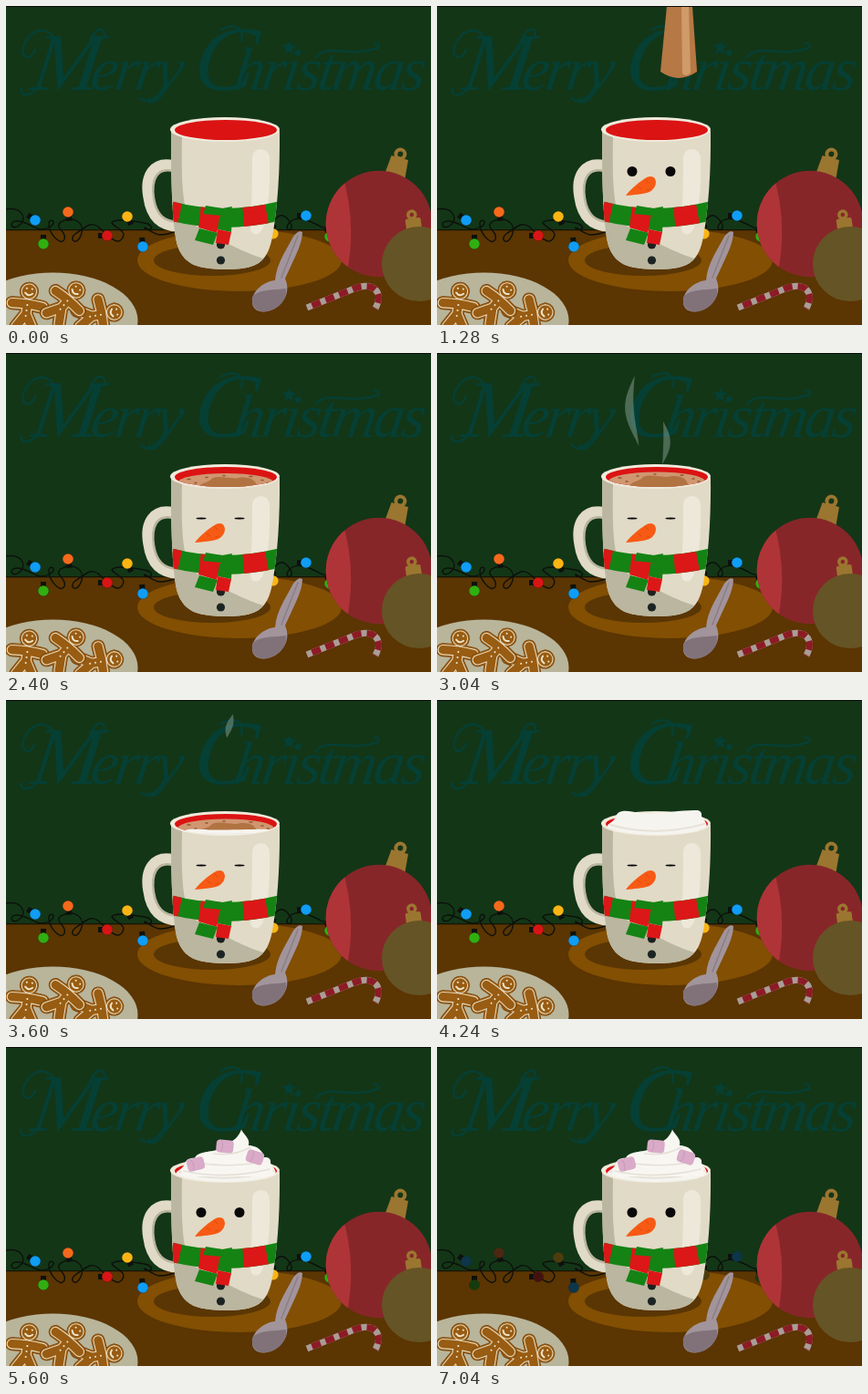
Animation, 466 px wide and 350 px high, one loop 7120 ms. Source, as an HTML page:

```html
<!DOCTYPE html>
<html lang="en">
<head>
<meta charset="utf-8">
<title>Christmas mug</title>
<style>
html, body { margin: 0; width: 100%; height: 100%; overflow: hidden; background: #133617; }
svg { display: block; }
text { font-family: "Liberation Serif", "Noto Serif", serif; font-style: italic; fill: #063f34; }
.line { fill: none; stroke-linecap: round; stroke-linejoin: round; }
</style>
</head>
<body>
<svg width="466" height="350" viewBox="0 0 466 350">
  <defs>
    <path id="body" d="M181 137C181 185 181.5 222 186 254C189 274 200 283 212 286C228 290 256 290 268 286C282 282 288 272 291.5 256C298 222 300.5 180 300 137Z"/>
    <clipPath id="inBody"><use href="#body"/></clipPath>
    <clipPath id="inCup"><ellipse cx="241" cy="136" rx="56" ry="11"/></clipPath>
    <clipPath id="overCup"><path d="M0 0H466V136H298A57 12 0 0 1 184 136H0Z"/></clipPath>
    <clipPath id="inBall"><circle cx="409" cy="239" r="58.3"/></clipPath>
    <path id="man" d="M-3 -17a3 3 0 1 0 6 0a3 3 0 1 0 -6 0M-17 -2Q0 -4 17 -2M0 -3V9M0 8L-9 23M0 8L9 23"/>
    <g id="cookie" class="line">
      <use href="#man" stroke="#77400b" stroke-width="15"/>
      <use href="#man" stroke="#985c12" stroke-width="13.8"/>
      <use href="#man" stroke="#e4d6b8" stroke-width="11.5"/>
      <use href="#man" stroke="#985c12" stroke-width="9.3"/>
      <path d="M-4 -15Q0 -11 4 -15M-3 -20h.1M3 -20h.1M0 -2h.1M0 4h.1M0 10h.1" stroke="#eee3c8" stroke-width="2"/>
    </g>
    <g id="mallow">
      <rect x="-9.5" y="-7" width="19" height="14" rx="4" fill="#d9abc8"/>
      <path d="M-4 -6Q-1 0 -4 6" class="line" stroke="#c99ab4"/>
    </g>
  </defs>

  <rect width="466" height="350" fill="#133617"/>

  <!-- lettering, leaning about its baseline -->
  <g transform="translate(0 92) skewX(-8)">
    <text x="26" font-size="90">M<tspan x="91" font-size="67" letter-spacing="-3.5">erry</tspan></text>
    <text x="203" font-size="101">C<tspan x="248" font-size="67" letter-spacing="-3">hristmas</tspan></text>
  </g>
  <g class="line" stroke="#063f34" stroke-width="2.5">
    <path d="M54 40C48 20 28 24 20 42C14 56 26 62 32 48"/>
    <path d="M34 90C26 101 14 98 17 91M92 38C98 24 108 22 108 32"/>
    <path d="M176 82C168 104 154 108 148 101M258 38C262 22 248 19 236 26"/>
    <path d="M340 56C354 40 374 58 408 46Q410 41 404 41"/>
  </g>
  <path d="M311 38l2 5 6 1-5 3 1 6-5-3-5 3 2-6-4-4 6-1z" fill="#063f34"/>

  <!-- table -->
  <rect y="246" width="466" height="104" fill="#5b3502"/>
  <rect y="245" width="466" height="1.3" fill="#151607"/>
  <ellipse cx="256" cy="279" rx="112" ry="34" fill="#824f03"/>
  <ellipse cx="226" cy="279" rx="64" ry="17" fill="#5a3604"/>

  <!-- lights -->
  <path class="line" stroke="#0c100a" stroke-width="1.4" d="M0 223C18 220 24 234 14 241C6 247 2 236 12 236C26 236 34 250 47 243C58 237 48 232 47 238C46 248 60 265 64 256C67 246 52 244 60 237C74 229 88 238 82 252C77 264 68 256 76 250C88 242 93 236 101 242C114 254 123 264 128 254C132 246 120 244 116 238C118 232 140 236 152 238C166 241 157 249 152 244C150 240 160 250 168 251Q178 251 186 247M290 244C298 224 306 228 312 238C317 247 305 248 309 240C317 227 334 236 347 243Q354 244 358 237"/>
  <g id="bulbs"></g>

  <!-- plate -->
  <ellipse cx="51.5" cy="345" rx="93" ry="52.5" fill="#b8b59b"/>
  <use href="#cookie" transform="translate(23 330) rotate(8)"/>
  <use href="#cookie" transform="translate(102 339) rotate(80)"/>
  <use href="#cookie" transform="translate(66 325) rotate(40)"/>

  <!-- mug -->
  <path class="line" d="M184 175C162 170 152 186 156 209C159 231 170 242 190 242" stroke="#e1dac6" stroke-width="11.5"/>
  <path class="line" d="M183 181C165 177 159 191 162 211C165 229 173 236 188 237" stroke="#b9b59e" stroke-width="2.5"/>
  <use href="#body" fill="#e1dac6"/>
  <g clip-path="url(#inBody)">
    <path d="M175 130L193 143C192 190 193 230 206 240C222 250 258 270 285 278L270 300H175Z" fill="#bab69f"/>
    <path d="M270 166Q271 157 280 157Q289 158 289 168C290 200 287 225 282 243Q277 254 270 249Q266 244 268 230C270 210 270 190 270 166Z" fill="#ede8da"/>
  </g>
  <ellipse cx="240" cy="135.5" rx="60" ry="13.5" fill="#f0eadc"/>
  <ellipse cx="241" cy="136" rx="56" ry="11" fill="#db1313"/>
  <g clip-path="url(#inCup)">
    <g id="drink">
      <ellipse cx="241" cy="141" rx="53" ry="10.5" fill="#cf9670"/>
      <path d="M211 150C209 140 222 142 226 136C236 132 248 138 257 135C270 134 276 139 276 150Z" fill="#b17342"/>
      <path class="line" stroke="#8f5830" stroke-width="1.4" d="M199 137h3M207 141h2M219 135h2M267 134h3M280 138h2M286 141h2M238 133h2"/>
    </g>
  </g>
  <circle cx="235.5" cy="262" r="4.6" fill="#1c201e"/>
  <circle cx="235.5" cy="279" r="4.6" fill="#1c2423"/>

  <!-- scarf -->
  <g clip-path="url(#inBody)" fill="none" stroke-width="21">
    <path d="M181 225Q238 240 300 225" stroke="#148314"/>
    <path d="M181 225Q238 240 300 225" stroke="#dc1717" stroke-dasharray="10 22 25 23 26 99"/>
  </g>
  <path d="M219 219L237 222L248 220L246 230L233 233L216 229Z" fill="#148314"/>
  <path d="M215 228L236 230L231 249L211 243Z" fill="#dc1717"/>
  <path d="M212 244L232 249L227 262L207 257Z" fill="#148314"/>
  <path d="M234 231L248 230L247 248L232 245Z" fill="#148314"/>
  <path d="M232 245L247 248L244 262L230 260Z" fill="#dc1717"/>

  <!-- face -->
  <ellipse class="eye" cx="214" cy="181.5" fill="#080808"/>
  <ellipse class="eye" cx="256" cy="181.5" fill="#080808"/>
  <g id="nose">
    <path d="M207 208C213 200 223 192 231 187.5Q239 185 240 193Q240 200 233 204C225 207 216 207 207 208Z" fill="#f75a14"/>
    <path class="line" stroke="#dc4a0b" d="M220 198l4 3M229 191l3 3M230 202l3-1"/>
  </g>

  <!-- pour, steam, toppings -->
  <g clip-path="url(#overCup)">
    <path id="pour" fill="#b67844"/>
    <path id="shine" fill="#d09b69"/>
    <g id="base">
      <path d="M186 141C186 134 193 136 196 128C199 119 211 122 222 124C240 126 270 120 286 121Q291 122 290 128C294 133 296 135 296 141V150H186Z" fill="#f6f4ef"/>
      <path class="line" stroke="#e7e2d9" stroke-width="2" d="M190 137Q240 151 293 136"/>
    </g>
    <g id="mound">
      <path d="M192 142C192 130 201 132 206 126C207 114 220 116 231 113C236 104 252 108 258 90.5C261 97 268 100 266 108C277 108 285 117 283 126C290 126 293 130 293 142Z" fill="#f8f6f1"/>
      <path class="line" stroke="#e5e0d8" stroke-width="1.7" d="M209 127Q245 133 280 126M228 117Q250 120 268 110M195 136Q240 146 289 134"/>
    </g>
  </g>
  <path class="wisp" fill="#bfd0ca" opacity=".34"/>
  <path class="wisp" fill="#bfd0ca" opacity=".34"/>
  <use class="drop" href="#mallow"/>
  <use class="drop" href="#mallow"/>
  <use class="drop" href="#mallow"/>

  <!-- spoon -->
  <path d="M315 253Q321 245 325 248Q325 258 318 273L306 299C312 313 306 324 296 331C283 339 269 336 270 323C271 311 284 302 295 301Q296 288 304 273Z" fill="#a2949b"/>
  <path d="M270 319C278 310 295 312 307 310C309 319 302 328 295 332C282 339 268 335 270 319Z" fill="#81727a"/>
  <path class="line" d="M320 252L302 298" stroke="#8c7e85" stroke-width="1.5"/>

  <!-- ornaments -->
  <g transform="rotate(15 429 175)" fill="#9b7630">
    <path d="M420 166H439L441 188H418Z"/>
    <circle cx="429" cy="162" r="5" fill="none" stroke="#9b7630" stroke-width="4"/>
  </g>
  <g clip-path="url(#inBall)">
    <circle cx="409" cy="239" r="59" fill="#872629"/>
    <path d="M345 180H367Q386 235 373 297H345Z" fill="#af3438"/>
  </g>
  <g transform="rotate(-8 446 237)" fill="#9b7630">
    <rect x="438" y="233" width="17" height="14" rx="2"/>
    <circle cx="446" cy="229" r="4" fill="none" stroke="#9b7630" stroke-width="3.5"/>
  </g>
  <circle cx="453" cy="283" r="41" fill="#655425"/>

  <!-- candy cane -->
  <g fill="none" stroke-width="7">
    <path d="M330 331L382 310C402 302 415 313 405 332" stroke="#aa9d97"/>
    <path d="M330 331L382 310C402 302 415 313 405 332" stroke="#8c1b25" stroke-dasharray="10 6" stroke-dashoffset="10"/>
  </g>
  <path d="M0 .5H466" stroke="#080d07"/>
</svg>
<script>
const LOOP = 7120, STEP = 80;
const $ = id => document.getElementById(id);
const all = name => [...document.getElementsByClassName(name)];
const set = (el, name, value) => el.setAttribute(name, value);
const ramp = (t, a, b) => Math.min(1, Math.max(0, (t - a) / (b - a)));
const mix = (a, b, p) => a + (b - a) * p;
const easeOut = p => 1 - (1 - p) ** 2;

// x, y, cap angle, colour
const bulbs = [
  [32, 235, 215, "#0f9df5"], [68, 226, 80, "#f5691c"], [41, 261, 270, "#31ae12"],
  [111, 252, 180, "#d81515"], [133, 231, 65, "#fab514"], [150, 264, 265, "#0f9df5"],
  [293, 250, 270, "#fab514"], [329, 230, 180, "#0f9df5"], [355, 253, 250, "#31ae12"]
];
$("bulbs").innerHTML = bulbs.map(([x, y, angle, colour]) =>
  `<g transform="translate(${x} ${y})">
    <rect x="4" y="-3" width="6" height="6" fill="#0d110d" transform="rotate(${angle})"/>
    <circle r="5.8" fill="#0d110d"/><circle class="glow" r="5.8" fill="${colour}"/></g>`).join("");

// x, y, tilt, fall start
const mallows = [[208, 128.5, -14, 4560], [240, 109, 6, 4760], [273, 121, 18, 4920]];

function lights(t) {
  if (t < 2480) return 1;
  const on = Math.floor((t + 80) / 320) % 2;
  const fade = (t + 80) % 320 < 80;
  return fade ? .65 : on ? 1 : .27;
}

function wispPath(head, tail, width, middle) {
  if (tail - head < 1) return "";
  const left = [], right = [];
  for (let i = 0; i <= 20; i++) {
    const y = mix(head, tail, i / 20);
    const x = middle(y);
    const half = width * Math.sin(Math.PI * i / 20);
    left.push(`${x - half} ${y}`);
    right.unshift(`${x + half} ${y}`);
  }
  return "M" + left.concat(right).join("L") + "Z";
}

function drawSteam(t) {
  const rise = (a, b, from, to) => mix(from, to, ramp(t, a, b));
  const [first, second] = all("wisp");
  set(first, "d", wispPath(
    rise(2400, 3040, 125, 25) - rise(3040, 3520, 0, 7),
    t < 3040 ? rise(2800, 3040, 125, 102) : rise(3040, 3600, 102, 18),
    4.8, y => 217 - 6 * Math.sin((y - 28) / 20) + (y - 64) * .03));
  set(second, "d", wispPath(
    t < 3040 ? rise(2800, 3040, 125, 75) : rise(3040, 3680, 75, 7),
    rise(3040, 3840, 122, 7),
    3.8, y => 247 + 5 * Math.sin((y - 72) / 16)));
}

function drawPour(t) {
  const tip = 78 * Math.max(0, (t - 1120) / 160) ** 2;
  const tail = 42 * Math.max(0, (t - 1680) / 240) ** 2;
  const shown = t > 1120 && tail < 150;
  const end = Math.min(tip, 160);
  const spread = 6 * ramp(end, 0, 78);
  let pour = "", shine = "";
  if (shown && t <= 1680) {
    pour = `M252 0H280L${280 + spread * .85} ${end - 6}Q265 ${end + 8} ${251 - spread} ${end - 6}Z`;
    shine = `M268 0H276L278 ${end - 5}Q274 ${end + 1} 269 ${end - 4}Z`;
  } else if (shown) {
    pour = `M249 160C250 ${mix(tail, 160, .6)} 254 ${tail + 18} 264 ${tail + 3}Q271 ${tail - 3} 277 ${tail + 2}C273 ${mix(tail, 160, .4)} 276 ${mix(tail, 160, .7)} 276 160Z`;
    shine = `M264 160C264 ${mix(tail, 160, .5)} 267 ${tail + 20} 273 ${tail + 8}C269 ${mix(tail, 160, .5)} 271 ${mix(tail, 160, .7)} 271 160Z`;
  }
  set($("pour"), "d", pour);
  set($("shine"), "d", shine);
}

function grow(el, p, x, y, both) {
  set(el, "transform", `translate(${x} ${y}) scale(${both ? p : 1} ${p}) translate(${-x} ${-y})`);
  set(el, "visibility", p > 0 ? "visible" : "hidden");
}

function draw(t) {
  all("glow").forEach(el => set(el, "opacity", lights(t)));

  const eye = 5.5 * easeOut(ramp(t, 0, 480));
  const closed = ramp(t, 1360, 1600) * (1 - ramp(t, 5120, 5360));
  all("eye").forEach(el => {
    set(el, "rx", eye);
    set(el, "ry", mix(eye, .9, closed));
  });
  grow($("nose"), easeOut(ramp(t, 640, 1040)), 236, 194, true);

  drawPour(t);
  const level = easeOut(ramp(t, 1920, 2560));
  set($("drink"), "transform", `translate(0 ${mix(24, 0, level)})`);
  drawSteam(t);

  grow($("base"), easeOut(ramp(t, 3520, 4160)), 241, 148);
  grow($("mound"), easeOut(ramp(t, 4240, 4800)), 241, 142, true);
  all("drop").forEach((el, i) => {
    const [x, y, tilt, start] = mallows[i];
    const p = ramp(t, start, start + 480);
    set(el, "transform", `translate(${x} ${mix(-12, y, p * p)}) rotate(${tilt + 70 * (1 - p)})`);
  });
}

const origin = performance.now();
function tick() {
  const t = (performance.now() - origin) % LOOP;
  draw(Math.floor(t / STEP) * STEP);
  requestAnimationFrame(tick);
}
tick();
</script>
</body>
</html>
```
